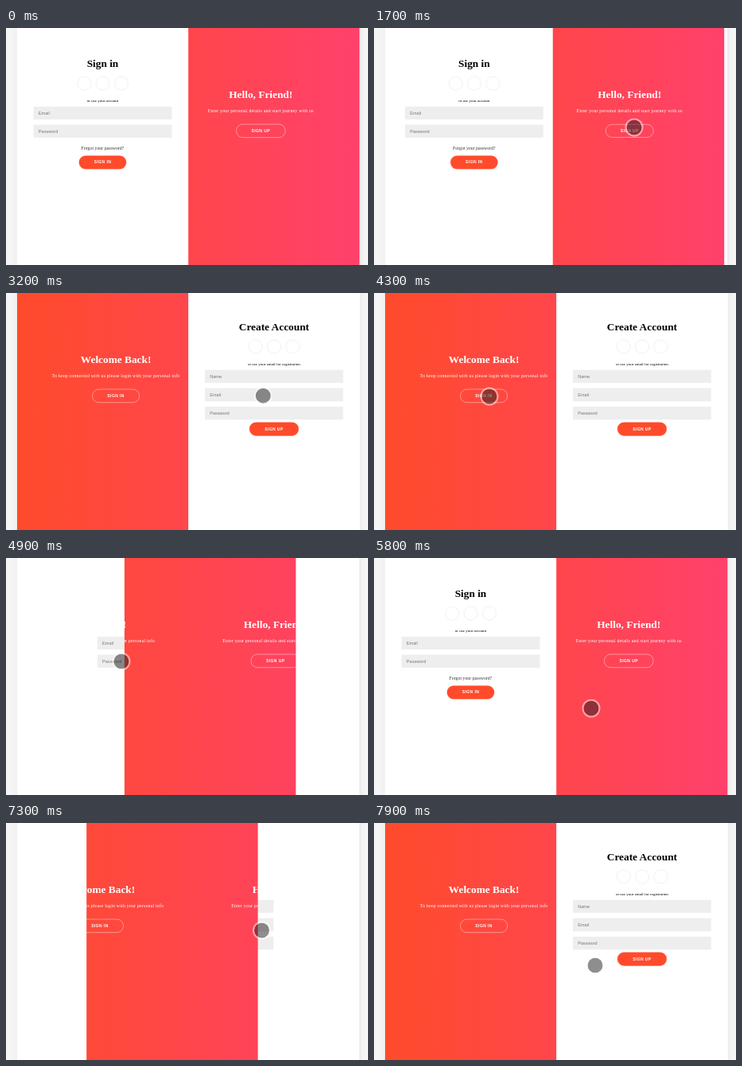
An HTML page for the animation above (8000 ms loop, 455 px wide and 298 px high).

```html
<!DOCTYPE html>
<html lang="en">
<head>
<meta charset="utf-8">
<title>Sliding sign-in panel</title>
<style>
  * { box-sizing: border-box; }
  html, body { margin: 0; width: 100%; height: 100%; overflow: hidden; background: #f6f6f6; }
  body { position: relative; font: 16px "Liberation Serif", "Times New Roman", serif; color: #000; }

  /* Laid out 1092 px wide, shown at 5/12 size */
  #world { position: absolute; left: 0; top: 0; width: 1092px; height: 716px;
    transform: scale(.4166667); transform-origin: 0 0; }
  .card { position: absolute; left: 33px; top: -100px; width: 1034px; height: 916px; background: #fff;
    box-shadow: 0 0 28px rgba(0,0,0,.06), 0 0 4px rgba(0,0,0,.22); }

  .form, .overlay { position: absolute; top: 100px; height: 716px; }
  .form { left: 0; width: 517px; padding: 0 50px; background: #fff;
    display: flex; flex-direction: column; align-items: center; }
  #signIn { z-index: 2; padding-top: 88.7px; }
  #signUp { padding-top: 84px; }

  h1 { margin: 0; font-size: 32px; line-height: 37px; font-weight: bold; white-space: nowrap; }
  .social { display: flex; gap: 14px; margin: 20px 0 24px; }
  .social i { width: 42px; height: 42px; border: 1px solid #ddd; border-radius: 50%; }
  .hint { font-size: 12px; line-height: 14px; margin-bottom: 3px; white-space: nowrap; }
  .field { width: 100%; margin: 8px 0; padding: 12px 15px; background: #eee; color: #757575;
    font: 13.333px/15.33px "Liberation Sans", Arial, sans-serif; }
  .forgot { margin: 15px 0; font-size: 14px; line-height: 16px; color: #333; }
  .btn { padding: 12px 45px; border: 1px solid #ff4b2b; border-radius: 20px;
    background: #ff4b2b; color: #fff; letter-spacing: 1px; white-space: nowrap;
    font: bold 12px/15px "Liberation Sans", Arial, sans-serif; }

  .overlay { left: 0; width: 1034px; z-index: 10; color: #fff;
    background: linear-gradient(to right, #ff4b2b, #ff416c); }
  .panel { position: absolute; top: 183px; width: 597px;
    display: flex; flex-direction: column; align-items: center; }
  #left { left: 0; }
  #right { right: 0; }
  .panel p { margin: 20px 0 30px; font-size: 14px; line-height: 20px; letter-spacing: .5px; white-space: nowrap; }
  .panel .btn { background: transparent; border-color: #fff; }

  #cursor { position: absolute; left: -11.5px; top: -11.5px; width: 23px; height: 23px; border-radius: 50%;
    border: 2px solid rgba(255,255,255,.5); background: rgba(30,30,30,.5) padding-box; }
</style>
</head>
<body>
<div id="world">
  <div class="card">
    <div class="form" id="signUp">
      <h1>Create Account</h1>
      <div class="social"><i></i><i></i><i></i></div>
      <div class="hint">or use your email for registration</div>
      <div class="field">Name</div>
      <div class="field">Email</div>
      <div class="field">Password</div>
      <div class="btn">SIGN UP</div>
    </div>
    <div class="form" id="signIn">
      <h1>Sign in</h1>
      <div class="social"><i></i><i></i><i></i></div>
      <div class="hint">or use your account</div>
      <div class="field">Email</div>
      <div class="field">Password</div>
      <div class="forgot">Forgot your password?</div>
      <div class="btn">SIGN IN</div>
    </div>
    <div class="overlay" id="overlay">
      <div class="panel" id="left">
        <h1>Welcome Back!</h1>
        <p>To keep connected with us please login with your personal info</p>
        <div class="btn" id="toSignIn">SIGN IN</div>
      </div>
      <div class="panel" id="right">
        <h1>Hello, Friend!</h1>
        <p>Enter your personal details and start journey with us</p>
        <div class="btn" id="toSignUp">SIGN UP</div>
      </div>
    </div>
  </div>
</div>
<div id="cursor"></div>

<script>
const LOOP = 8000, STEP = 100, SLIDE = 600, HALF = 517, DRIFT = 119.4;
const $ = id => document.getElementById(id);
const slideX = (el, x) => { el.style.transform = `translateX(${x}px)`; };

const clicks = [
  { at: 1639, open: true },
  { at: 4555, open: false },
  { at: 6967, open: true }
];

// Cursor legs: start, end, target and an optional bend point
const entry = [439.5, 93.5];
const legs = [
  { from: 500, to: 1400, end: [326.5, 124.5] },
  { from: 3100, to: 4000, end: [154.5, 135.5], bend: [250, 211] },
  { from: 4000, to: 4300, end: [144.5, 129.5] },
  { from: 5400, to: 5800, end: [272.5, 188.5] },
  { from: 6000, to: 6700, end: [321, 134.5] },
  { from: 7700, to: 7900, end: [277.5, 178.5] }
];

// cubic-bezier(.42, 0, .58, 1)
function ease(x) {
  if (x <= 0) return 0;
  if (x >= 1) return 1;
  let lo = 0, hi = 1, s;
  for (let i = 0; i < 24; i++) {
    s = (lo + hi) / 2;
    const r = 1 - s;
    if (1.26 * s * r * r + 1.74 * s * s * r + s * s * s < x) lo = s; else hi = s;
  }
  return s * s * (3 - 2 * s);
}

function cursorAt(t) {
  let pos = entry;
  for (const { from, to, end, bend } of legs) {
    if (t < from) break;
    const k = ease((t - from) / (to - from)), start = pos;
    pos = start.map((a, i) => {
      const mid = bend ? bend[i] : (a + end[i]) / 2;
      return a * (1 - k) ** 2 + 2 * mid * k * (1 - k) + end[i] * k * k;
    });
  }
  return pos;
}

function draw(t) {
  const click = clicks.filter(c => c.at <= t).pop() || { at: -LOOP, open: false };
  const since = t - click.at, q = ease(since / SLIDE);
  const p = click.open ? q : 1 - q;

  // Opening swaps the forms halfway; closing fades the upper one out
  const late = since >= SLIDE / 2;
  const upFront = click.open ? late : q < .625;
  $('signUp').style.opacity = click.open ? +late : 1 - q;
  $('signUp').style.zIndex = upFront ? 5 : 1;
  slideX($('signIn'), HALF * p);
  slideX($('signUp'), HALF * p);

  $('overlay').style.clipPath = `inset(0 ${HALF * p}px 0 ${HALF * (1 - p)}px)`;
  slideX($('left'), -DRIFT * (1 - p));
  slideX($('right'), DRIFT * p);

  const press = since < 100 ? .97 : 1;
  $('toSignUp').style.transform = `scale(${click.open ? press : 1})`;
  $('toSignIn').style.transform = `scale(${click.open ? 1 : press})`;

  const [x, y] = cursorAt(t);
  $('cursor').style.transform = `translate(${x}px, ${y}px)`;
  $('cursor').style.visibility = t < legs[0].from ? 'hidden' : 'visible';
}

const begun = performance.now();
function tick() {
  const t = (performance.now() - begun) % LOOP;
  draw(Math.floor(t / STEP) * STEP);
  requestAnimationFrame(tick);
}
tick();
</script>
</body>
</html>
```
